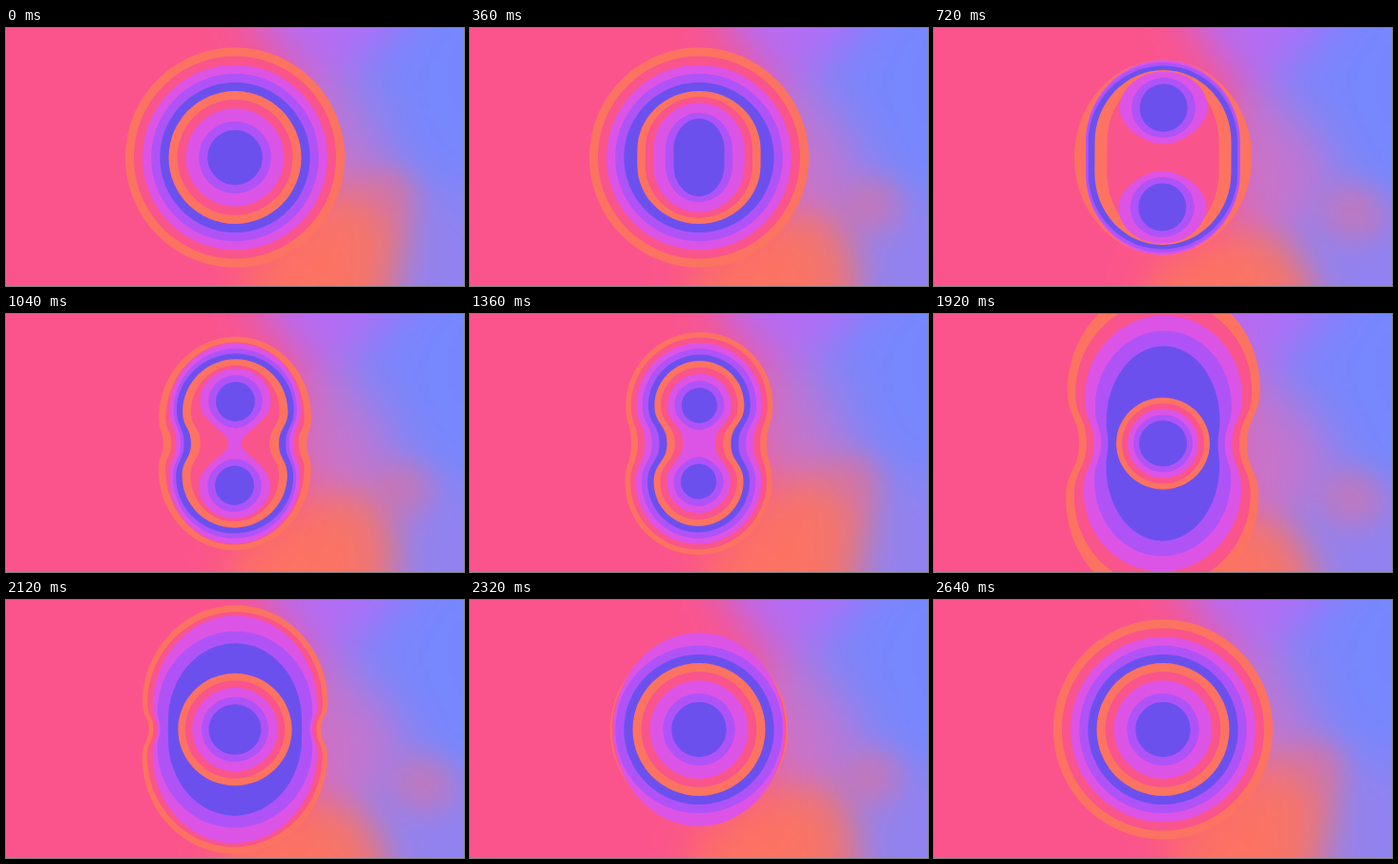
These frames come from a looping animation (480x270 px, 2.68 s). An HTML page with a canvas:

```html
<!DOCTYPE html>
<html lang="en">
<head>
<meta charset="utf-8">
<title>Zero to eight</title>
<style>
  html, body { margin: 0; width: 100%; height: 100%; overflow: hidden; background: #fb548c; }
  canvas { display: block; width: 100vw; height: 100vh; }
</style>
</head>
<body>
<canvas id="stage" width="480" height="270"></canvas>
<script>
const LOOP = 2680, STEP = 40, LAYERS = 10;
const ctx = document.getElementById('stage').getContext('2d');
const COLORS = ['#fc7361', '#f9548c', '#dc54e6', '#af53f7', '#6c50ee'];

// Poses are [half width, half height, lobe offset, waist];
// a negative waist splits the shape into two lobes.
// Layer 0 is the outermost ring; the first five surround the inner five.
const oval = (a, h = a, d = 0) => [a, h, d, a];
const radius = i => 115 - 9.1 * i - (i > 7 ? 4.4 : 0);
const zero = i => oval(radius(i));
const narrow = i => oval(radius(i) * .93, radius(i) + 3 * (i - 5), 8);

function split(i) {
  if (i < 2) return oval(93 - 14 * i, 102 - 6 * i);
  if (i < 7) return oval(81 - .35 * (i - 2) ** 3, 104 - .5 * i * i, 16);
  const k = 9 - i, r = 25 + 6.5 * k;
  return [r + 2 * k * k, 52 + r, 52, r - 52];
}

function eight(i) {
  const a = 77 - 5.4 * i - .12 * i * i;
  return [a, a + 39.5, 40, i < 8 ? a - 6 - 1.5 * i : a - 40];
}

function tall(i) {
  if (i > 4) return oval(79 - 6 * i, 78 - 6 * i);
  const a = 101 - 8 * i - .6 * i * i;
  return [a, 166 - 16 * i, 56 - 2 * i * i, a - 13 + .7 * i * i];
}

const squash = i => i < 3 ? oval(93 - 1.7 * i, 94 + 1.8 * i * i) : zero(i);

const layers = Array.from({ length: LAYERS }, (_, i) => [
  [0, zero(i)],
  i < 5 ? [570, zero(i)] : [360, narrow(i)],
  [720, split(i)],
  [1240, eight(i)],
  [1450, eight(i)],
  [1920, tall(i)],
  [2320, squash(i)],
  [2600, zero(i)],
  [LOOP, zero(i)]
]);

// Monotone cubic through keyed vectors, resting at both ends and at peaks.
function sample(keys, t) {
  let n = 0;
  while (n < keys.length - 2 && t >= keys[n + 1][0]) n++;
  const [t0, p0] = keys[n], [t1, p1] = keys[n + 1];
  const dt = t1 - t0, u = (t - t0) / dt;
  const slope = (k, c) => k < 0 || k > keys.length - 2 ? 0 :
    (keys[k + 1][1][c] - keys[k][1][c]) / (keys[k + 1][0] - keys[k][0]);
  const tangent = (k, c) => {
    const a = slope(k - 1, c), b = slope(k, c);
    return a * b > 0 ? 2 * a * b / (a + b) : 0;
  };
  return p0.map((v, c) => {
    const m0 = tangent(n, c) * dt, m1 = tangent(n + 1, c) * dt, u2 = u * u, u3 = u2 * u;
    return v + (p1[c] - v) * (3 * u2 - 2 * u3) + m0 * (u3 - 2 * u2 + u) + m1 * (u3 - u2);
  });
}

function blob([a, h, d, w], color) {
  const k = .552, ry = h - d;
  const grip = d * .5 * Math.min(1, Math.max(0, w) / 12);
  const low = d + w, flat = k * a * Math.min(1, -w / 20);
  ctx.save();
  ctx.transform(1, 0, -.00025 * d, 1, 240, 135.5);
  ctx.beginPath();
  for (const s of [1, -1]) {
    const curve = (x1, y1, x2, y2, x, y) =>
      ctx.bezierCurveTo(s * x1, s * y1, s * x2, s * y2, s * x, s * y);
    const cap = () => {
      curve(-a, -d - k * ry, -k * a, -h, 0, -h);
      curve(k * a, -h, a, -d - k * ry, a, -d);
    };
    if (w > 0) {
      if (s === 1) ctx.moveTo(-w, 0);
      curve(-w, -grip, -a, -d * .5, -a, -d);
      cap();
      curve(a, -d * .5, w, -grip, w, 0);
    } else {
      ctx.moveTo(0, s * w);
      curve(-flat, w, -a, -d + k * low, -a, -d);
      cap();
      curve(a, -d + k * low, flat, w, 0, w);
    }
  }
  ctx.fillStyle = color;
  ctx.fill();
  ctx.restore();
}

// Soft colour field: normalised gaussian blend of swaying points.
const CELL = 6, COLS = 80, ROWS = 45;
const field = document.createElement('canvas');
field.width = COLS;
field.height = ROWS;
const fieldCtx = field.getContext('2d');
const pixels = fieldCtx.createImageData(COLS, ROWS);
const PINK = [251, 84, 140], BLUE = [118, 135, 253], ORANGE = [252, 115, 97];
const LILAC = [200, 116, 205], VIOLET = [180, 108, 246], MAUVE = [145, 130, 240];
const ROSE = [218, 114, 160];
const point = (color, size, x, y, dx = 0, dy = 0) => ({ color, size, x, y, dx, dy });
const points = [
  ...[30, 130, 235].map(y => point(PINK, 45, 140, y)),
  point(PINK, 45, 240, 70),
  point(PINK, 45, 245, 165),
  point(BLUE, 45, 490, 115),
  point(BLUE, 45, 425, 70, -5, 8),
  point(VIOLET, 40, 340, -10, -5),
  point(LILAC, 40, 350, 130, -5, -10),
  point(MAUVE, 42, 450, 225, 14, -10),
  point(ORANGE, 40, 315, 258, 15, -25),
  point(ORANGE, 28, 365, 242, 12, -32),
  point(ROSE, 19, 421, 186, -20, -10)
];

function backdrop(t) {
  const sway = Math.cos(4 * Math.PI * t / LOOP);
  const now = points.map(p =>
    [p.color, 1 / (2 * p.size ** 2), p.x + p.dx * sway, p.y + p.dy * sway]);
  for (let i = 0; i < COLS * ROWS; i++) {
    const px = (i % COLS + .5) * CELL, py = (Math.floor(i / COLS) + .5) * CELL;
    const mix = [0, 0, 0];
    let sum = 0;
    for (const [color, f, x, y] of now) {
      const weight = Math.exp(-((px - x) ** 2 + (py - y) ** 2) * f);
      for (let c = 0; c < 3; c++) mix[c] += color[c] * weight;
      sum += weight;
    }
    for (let c = 0; c < 3; c++) pixels.data[i * 4 + c] = mix[c] / sum;
    pixels.data[i * 4 + 3] = 255;
  }
  fieldCtx.putImageData(pixels, 0, 0);
  ctx.imageSmoothingQuality = 'high';
  ctx.drawImage(field, 0, 0, 480, 270);
}

function draw(t) {
  backdrop(t);
  layers.forEach((keys, i) => blob(sample(keys, t), COLORS[i % COLORS.length]));
}

const start = performance.now();
function tick() {
  const t = (performance.now() - start) % LOOP;
  draw(Math.floor(t / STEP) * STEP);
  requestAnimationFrame(tick);
}
tick();
</script>
</body>
</html>
```
